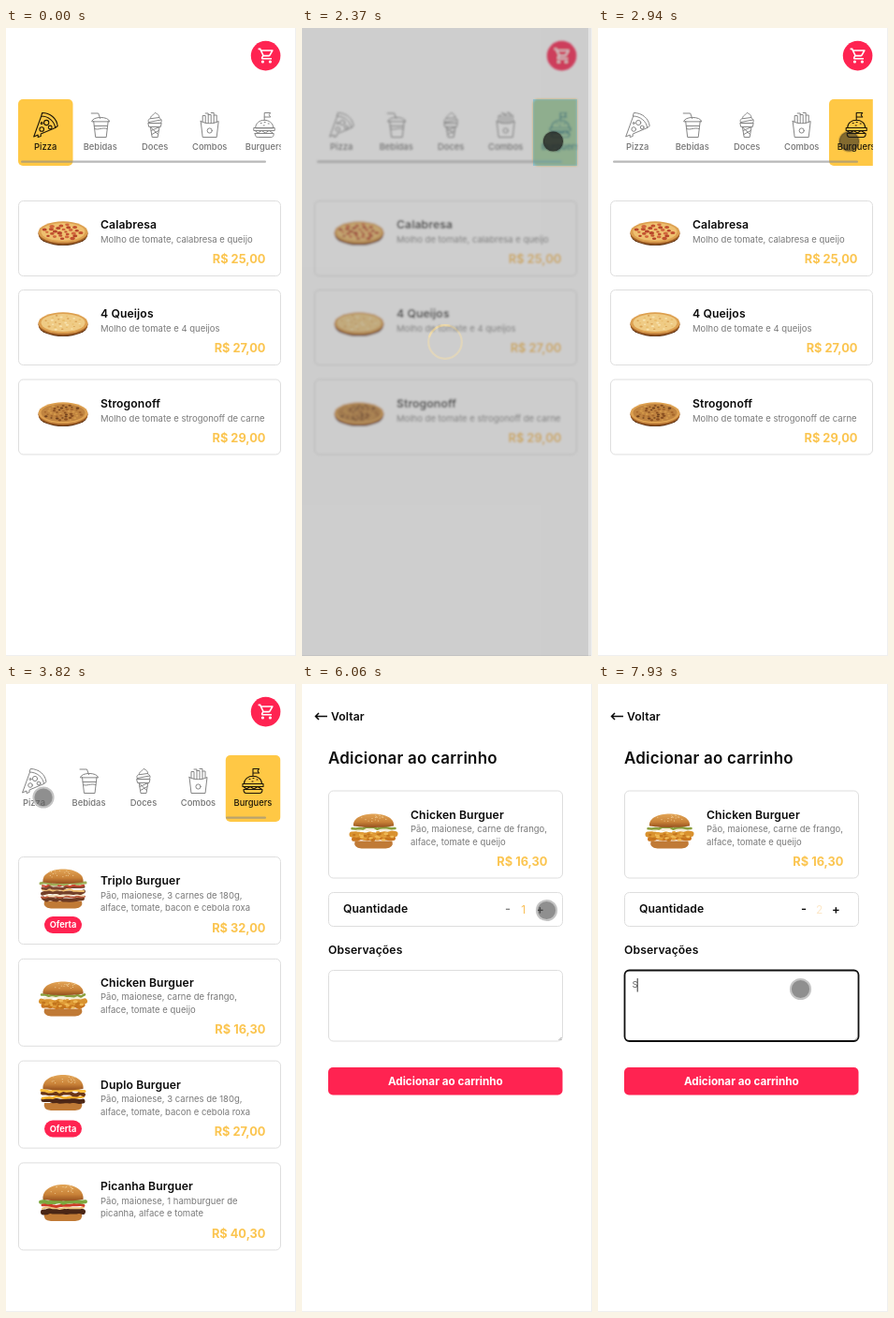
These frames come from a looping animation (310 by 670 pixels, 8 s). An HTML page:

```html
<!DOCTYPE html>
<html lang="pt-BR">
<head>
<meta charset="utf-8">
<title>Cardápio</title>
<style>
html, body { margin: 0; width: 100%; height: 100%; overflow: hidden; background: #fff; }
svg { display: block; width: 310px; height: 670px; }
text { font-family: Inter, Roboto, sans-serif; fill: #0b0b0b; }
.name { font-size: 12.2px; font-weight: 600; letter-spacing: .1px; }
.desc { font-size: 9.5px; fill: #797979; }
.price { font-size: 12.8px; font-weight: 700; fill: #fbc550; }
.tab { font-size: 9.4px; font-weight: 500; fill: #747474; }
.on .tab { fill: #1c1608; }
.badge { font-size: 9.2px; font-weight: 700; fill: #fff; }
.head { font-size: 16.9px; font-weight: 600; letter-spacing: .25px; }
.btn { font-size: 11.7px; font-weight: 700; fill: #fff; }
.sign { font-size: 13px; font-weight: 600; }
.icon { fill: none; stroke: #858585; stroke-width: 1; stroke-linecap: round; stroke-linejoin: round; }
.on .icon { stroke: #1c1608; stroke-width: 1.1; }
.box { fill: #fff; stroke: #dedede; }
</style>
</head>
<body>
<svg id="stage" viewBox="0 0 310 670"></svg>
<script>
const RED = '#ff2351', YELLOW = '#ffc845', LOOP = 8000;

let seed = 7;
const rnd = () => (seed = (seed * 16807) % 2147483647) / 2147483647;

const text = (x, y, cls, str, anchor = 'start') =>
  `<text x="${x}" y="${y}" class="${cls}" text-anchor="${anchor}">${str}</text>`;
const rect = (x, y, w, h, r, attrs) =>
  `<rect x="${x}" y="${y}" width="${w}" height="${h}" rx="${r}" ${attrs}/>`;
const ellipse = (x, y, rx, ry, fill) =>
  `<ellipse cx="${x.toFixed(1)}" cy="${y.toFixed(1)}" rx="${rx}" ry="${ry}" fill="${fill}"/>`;
const at = (x, y, body) => `<g transform="translate(${x} ${y})">${body}</g>`;
const box = (x, y, w, h) => rect(x + .5, y + .5, w, h, 5, 'class="box"');

// count bits scattered over an ellipse
function scatter(count, rx, ry, cy, size, colors) {
  let out = '';
  for (let i = 0; i < count; i++) {
    const a = i * 2.4, r = Math.sqrt((i + .5) / count), s = size * (.7 + rnd() * .5);
    out += ellipse(r * rx * Math.cos(a), cy + r * ry * Math.sin(a),
      s.toFixed(1), (s * .6).toFixed(1), colors[i % colors.length]);
  }
  return out;
}

function pizza(x, y, cheese, bits) {
  return at(x, y,
    ellipse(0, 2.5, 26, 11, '#5f3212') + ellipse(0, .8, 26.6, 11.6, '#a8662a') +
    ellipse(0, -.8, 26.4, 11.4, '#dda050') + ellipse(0, -1, 23.5, 9.6, cheese) + bits);
}

function ribbon([color, y, w, h]) {
  let d = '';
  for (let i = 0; i <= 12; i++)
    d += `${i ? 'L' : 'M'}${(-w + i * w / 6).toFixed(1)} ${(y + rnd() * 2.4 - 1.2).toFixed(1)}`;
  return `<path d="${d}" fill="none" stroke="${color}" stroke-width="${h}" stroke-linejoin="round" stroke-linecap="round"/>`;
}

function burger(x, y, base, rise, bottom, layers, bits = '') {
  const r = rise * 1.33, b = bottom;
  let seeds = '';
  for (let i = 0; i < 18; i++)
    seeds += ellipse((rnd() - .5) * 28, base - rise * (.4 + rnd() * .5), .7, .45, '#f8dfae');
  return at(x, y,
    `<path d="M-20 ${b}H20Q22 ${b + 7} 13 ${b + 8}H-13Q-22 ${b + 7} -20 ${b}Z" fill="#c07a36"/>` +
    layers.map(ribbon).join('') + bits +
    `<path d="M-21.5 ${base}C-24 ${base - r} 24 ${base - r} 21.5 ${base}Q0 ${base + 3} -21.5 ${base}Z" fill="url(#bun)"/>` + seeds);
}

const triplo = (x, y) => burger(x, y, -7, 14, 13, [
  ['#6d3a22', 11, 21, 4], ['#b9583a', 8.5, 23, 2], ['#f4e3c0', 6.5, 22, 2], ['#74402a', 4, 22, 4],
  ['#f0c070', 1.5, 22, 2], ['#7c4630', -1, 22, 3], ['#c9462e', -3.5, 22, 2], ['#9fae58', -5.5, 24, 3]]);
const chicken = (x, y) => burger(x, y, -6, 13, 10, [
  ['#c9761f', 7, 21, 5], ['#d9922f', 3, 23, 6], ['#f5ecd5', -2, 20, 2.5], ['#8a9f3d', -4, 23, 2.5]],
  scatter(26, 22, 4.5, 5, 2.2, ['#efb955', '#c2741d', '#e09c38']));
const duplo = (x, y) => burger(x, y, -4, 15, 11, [
  ['#4d2716', 8.5, 21, 5], ['#f5b22c', 5, 22, 2.5], ['#6a3517', 1.5, 22, 4], ['#f7bc3a', -2, 23, 3]]);
const picanha = (x, y) => burger(x, y, -3, 16, 12, [
  ['#4a2616', 9.5, 21, 6], ['#ecc27c', 6, 22, 2], ['#cc3d27', 3.5, 22, 3], ['#7ca83f', 0, 24, 4]]);

const icons = [
  `<path d="M-3.5 -13C5 -13 12 -7 13 1L10.5 3C9.5 -4 3 -9.5 -4.5 -9.5ZM-4.5 -9.5L-12.5 12.5L-8 10.5V13L-5 12V9.5L10.5 3"/>
   <circle cx="1" cy="-2.5" r="2.6"/><circle cx="-4" cy="4.5" r="2.3"/><circle cx="5" cy="2.5" r="1.9"/><circle cx="-4" cy="-2" r="1"/>`,
  `<path d="M-9.5 -12.5H-2L0 -7M-9 -4C-8 -9.5 9 -9.5 10 -4ZM-7 -4L-5 13H6.5L8.5 -4M-6.4 1H7.9M-6 4C-2 6 2 2 7.4 4"/>`,
  `<path d="M-5.5 -2C-8.5 -3 -7 -7 -4.5 -7C-5 -10 -2 -10 0 -13C3 -12 5 -10 4.5 -7.5C7.5 -6.5 8 -3 5.5 -2ZM-4.5 -6.8L4.5 -8M-6.5 -3L6.5 -5.5M-7 -2H7L6 2H-6ZM-4.8 2L-3 13H3L4.8 2M-4 6L4 2.5M-3.3 10L4 6M-4 3L3.3 10"/>`,
  `<path d="M-9.5 -4L-7.5 13H7.5L9.5 -4C4 -1 -4 -1 -9.5 -4ZM-7.5 -3.5V-10H-4.5V-2M-4.5 -12.5H-1.5V-2M-1.5 -11H1.5V-2M1.5 -13H4.5V-2M4.5 -10.5H7.5V-3.5"/><circle cx="0" cy="6" r="2.6"/>`,
  `<path d="M0 -5V-13H6.5L5 -10.8L6.5 -8.5H0M-9.5 3C-9.5 -8 9.5 -8 9.5 3ZM-11 3H11V6H-11ZM-10 6L-7 8.5L-3 6L1 8.5L5 6L9 8.5M-10 9H10C10 12 9 13 7 13H-7C-9 13 -10 12 -10 9Z"/>
   <path d="M-4 -2H-3M0 -3H1M4 -1.5H5M-1 .5H0"/>`
];
const tabs = ['Pizza', 'Bebidas', 'Doces', 'Combos', 'Burguers'].map((name, i) => {
  const x = 13 + 58.5 * i;
  return `<g class="item">${rect(x, 76, 58.5, 71, 5, 'fill="none"')}
    <g class="icon" transform="translate(${x + 29.2} 103.5)">${icons[i]}</g>
    ${text(x + 29.2, 130, 'tab', name, 'middle')}</g>`;
}).join('');

const pizzaCard = (y, name, desc, price) => box(13, y, 280, 80) +
  text(101, y + 30, 'name', name) + text(101, y + 45, 'desc', desc) +
  text(277.5, y + 67, 'price', price, 'end');
const pizzas =
  pizzaCard(184, 'Calabresa', 'Molho de tomate, calabresa e queijo', 'R$ 25,00') +
  pizzaCard(279, '4 Queijos', 'Molho de tomate e 4 queijos', 'R$ 27,00') +
  pizzaCard(374.5, 'Strogonoff', 'Molho de tomate e strogonoff de carne', 'R$ 29,00') +
  pizza(61, 218.5, '#eec070', scatter(26, 21, 8.3, -1, 2.4, ['#c2502f', '#b8452a', '#d2663c'])) +
  pizza(61, 315.5, '#efcb85', scatter(30, 21, 8.3, -1, 1.4, ['#f7e2ae', '#d9a255', '#e8bd6c'])) +
  pizza(61, 411.5, '#c08440', scatter(46, 21, 8.5, -1, 1.6, ['#8a4f20', '#d59a4a', '#a5652b', '#70401c']));

const burgerText = (x, y, right, name, l1, l2, price) =>
  text(x, y + 30, 'name', name) + text(x, y + 44.5, 'desc', l1) + text(x, y + 58, 'desc', l2) +
  text(right, y + 80.5, 'price', price, 'end');
const burgerCard = (i, ...info) => {
  const y = 184 + 108.8 * i;
  return box(13, y, 280, 93) + burgerText(101, y, 277.5, ...info);
};
const badge = y => rect(41, y, 40, 18, 9, `fill="${RED}"`) + text(61, y + 12.4, 'badge', 'Oferta', 'middle');
const mix = ['Pão, maionese, 3 carnes de 180g,', 'alface, tomate, bacon e cebola roxa'];
const crispy = ['Chicken Burguer', 'Pão, maionese, carne de frango,', 'alface, tomate e queijo', 'R$ 16,30'];
const burgers =
  burgerCard(0, 'Triplo Burguer', ...mix, 'R$ 32,00') +
  burgerCard(1, ...crispy) +
  burgerCard(2, 'Duplo Burguer', ...mix, 'R$ 27,00') +
  burgerCard(3, 'Picanha Burguer', 'Pão, maionese, 1 hamburguer de', 'picanha, alface e tomate', 'R$ 40,30') +
  triplo(61, 218.5) + badge(248) + chicken(61, 336.5) + duplo(61, 436) + badge(465.5) + picanha(61, 553);

const cart = `<circle cx="277.6" cy="29.6" r="15.8" fill="${RED}"/>
  <path transform="translate(268.8 20) scale(.8)" fill="#fff" d="M15.55 13c.75 0 1.41-.41 1.75-1.03l3.58-6.49A1 1 0 0 0 20 4H5.2l-.94-2H1v2h2l3.6 7.6-1.35 2.43C4.5 15.4 5.5 17 7 17h12v-2H7l1.1-2zM6.16 6h12.15l-2.76 5H8.53z"/>
  <circle cx="274.4" cy="36" r="1.6" fill="#fff"/><circle cx="282.4" cy="36" r="1.6" fill="#fff"/>`;

const detail =
  `<path d="M27 34.5H15M18 31L14.5 34.5L18 38" fill="none" stroke="#0b0b0b" stroke-width="1.5"/>` +
  text(31, 39, 'name', 'Voltar') + text(28, 85, 'head', 'Adicionar ao carrinho') +
  box(28, 113.5, 250, 93) + chicken(76.5, 157.5) + burgerText(116, 113.5, 262.5, ...crispy) +
  box(28, 222, 250, 36) + text(44, 244, 'name', 'Quantidade') +
  `<g id="minus">${text(220, 244, 'sign', '-', 'middle')}</g>` +
  text(254.3, 244.8, 'sign', '+', 'middle') +
  `<text id="qty" x="236.7" y="244.6" text-anchor="middle" font-size="12"></text>` +
  text(28, 288, 'name', 'Observações') +
  `<g id="area">${rect(28.5, 305.5, 250, 75.5, 5, 'fill="#fff"')}</g>` +
  `<path d="M274.5 380L277.5 377M276.5 380L277.5 379" stroke="#777" stroke-width=".7"/>` +
  `<text id="note" x="36.5" y="324" font-size="9.6" style="fill:#666"></text>` +
  rect(0, 314, 1, 14.5, 0, 'id="caret" fill="#333"') +
  rect(28, 409, 250.5, 29.5, 5, `fill="${RED}"`) +
  text(153.3, 428, 'btn', 'Adicionar ao carrinho', 'middle');

document.getElementById('stage').innerHTML = `
  <defs>
    <filter id="blur" filterUnits="userSpaceOnUse" x="0" y="0" width="310" height="670"><feGaussianBlur id="soft" stdDeviation="0"/></filter>
    <clipPath id="strip"><rect x="13" y="70" width="280.8" height="80"/></clipPath>
    <linearGradient id="bun" x2="0" y2="1"><stop stop-color="#e2a557"/><stop offset=".6" stop-color="#c98238"/><stop offset="1" stop-color="#94501f"/></linearGradient>
  </defs>
  <rect width="310" height="670" fill="#fff"/>
  <path d="M309.5 0V670M0 669.5H310" stroke="#efefef"/>
  <g id="menu">${cart}
    <g clip-path="url(#strip)"><g id="tabs">${tabs}</g></g>
    ${rect(16, 141.5, 262, 2.2, 1, 'id="bar" fill="#8a8a8a" fill-opacity=".6"')}
    <g id="pizzas">${pizzas}</g><g id="burgers">${burgers}</g>
  </g>
  <g id="load">
    <rect width="306" height="670" fill="#737373" fill-opacity=".7"/>
    <rect x="306" width="3" height="670" fill="#737373" fill-opacity=".4"/>
    <circle cx="153" cy="335" r="17.8" fill="none" stroke="${YELLOW}" stroke-opacity=".4" stroke-width="2.2"/>
    <path id="spin" d="M140.4 322.4A17.8 17.8 0 0 1 165.6 322.4" fill="none" stroke="${YELLOW}" stroke-opacity=".5" stroke-width="2.2"/>
  </g>
  <rect id="tap" x="247" y="76" width="47" height="71" fill="#33b5e5" fill-opacity=".4"/>
  <g id="detail">${detail}</g>
  <g id="cursor"><circle r="10.6"/></g>`;

const $ = id => document.getElementById(id);
const set = (el, attrs) => { for (const k in attrs) el.setAttribute(k, attrs[k]); };
const show = (id, on) => set($(id), { display: on ? 'inline' : 'none' });

// progress in n equal jumps, the first at a and the last at b
const jumps = (t, a, b, n) =>
  t < a ? 0 : Math.min(1, (Math.floor((t - a) * (n - 1) / (b - a) + .02) + 1) / n);

// begin, end, jumps, then start, control and end points
const moves = [
  [730, 1020, 5, [274, 684], [172, 580], [170, 499]],
  [1280, 1560, 5, [170, 499], [178, 370], [229.5, 264.5]],
  [1820, 2170, 6, [229.5, 264.5], [250, 190], [268.5, 121]],
  [3670, 3820, 3, [268.5, 121], [150, 121], [40, 121]],
  [4290, 4780, 8, [40, 121], [425, 200], [191.5, 340]],
  [5640, 6060, 7, [191.5, 340], [215, 285], [261.5, 241.5]],
  [6520, 6940, 7, [261.5, 241.5], [250, 290], [216.5, 325.5]]
];
function cursorAt(t) {
  const [a, b, n, p, c, q] = moves.filter(m => t >= m[0]).pop() || moves[0];
  const u = jumps(t, a, b, n), v = 1 - u;
  return p.map((s, i) => (v * v * s + 2 * u * v * c[i] + u * u * q[i]).toFixed(1));
}

function draw(t) {
  const inMenu = t < 5110;
  show('menu', inMenu);
  show('detail', !inMenu);

  const active = t < 2240 ? 0 : 4;
  document.querySelectorAll('.item').forEach((item, i) => {
    item.classList.toggle('on', i === active);
    set(item.firstElementChild, { fill: i === active ? YELLOW : 'none' });
  });
  const scroll = 12.2 * jumps(t, 3670, 3820, 3);
  set($('tabs'), { transform: `translate(${-scroll} 0)` });
  show('bar', t < 4150);
  set($('bar'), t < 3820 ? { x: 16, width: 262 } : { x: 235, width: 43 });
  show('pizzas', t < 3010);
  show('burgers', t >= 3010);

  const veil = jumps(t, 2240, 2450, 4) - jumps(t, 2650, 2870, 4);
  show('load', veil > 0);
  set($('load'), { opacity: veil });
  set($('spin'), { transform: `rotate(${(t - 2450) * .36} 153 335)` });
  set($('soft'), { stdDeviation: 2.3 * veil });
  if (veil > 0) set($('menu'), { filter: 'url(#blur)' });
  else $('menu').removeAttribute('filter');
  show('tap', t >= 2240 && t < 2580);

  const twice = t >= 6520, focus = t >= 7140, typed = t >= 7930;
  set($('minus'), { opacity: twice ? 1 : .5 });
  $('qty').textContent = twice ? 2 : 1;
  $('qty').style.fill = twice ? '#fde8c8' : '#f9c05a';
  set($('area'), { stroke: focus ? '#101010' : '#dedede', 'stroke-width': focus ? 1.8 : 1 });
  $('note').textContent = typed ? 'S' : '';
  show('caret', focus && (t < 7670 || typed));
  set($('caret'), { x: typed ? 41.7 : 36 });

  const press = t >= 2240 && t < 3010;
  show('cursor', t >= 730);
  set($('cursor'), {
    transform: `translate(${cursorAt(t)})`,
    fill: press ? '#1e1e1e' : '#606060',
    'fill-opacity': press ? (t < 2650 ? .75 : .55) : .7,
    stroke: press ? '#1e1e1e' : '#c4c4c4',
    'stroke-opacity': press ? .2 : 1,
    'stroke-width': 2
  });
}

const start = performance.now();
function tick() {
  draw((performance.now() - start) % LOOP);
  requestAnimationFrame(tick);
}
tick();
</script>
</body>
</html>
```
